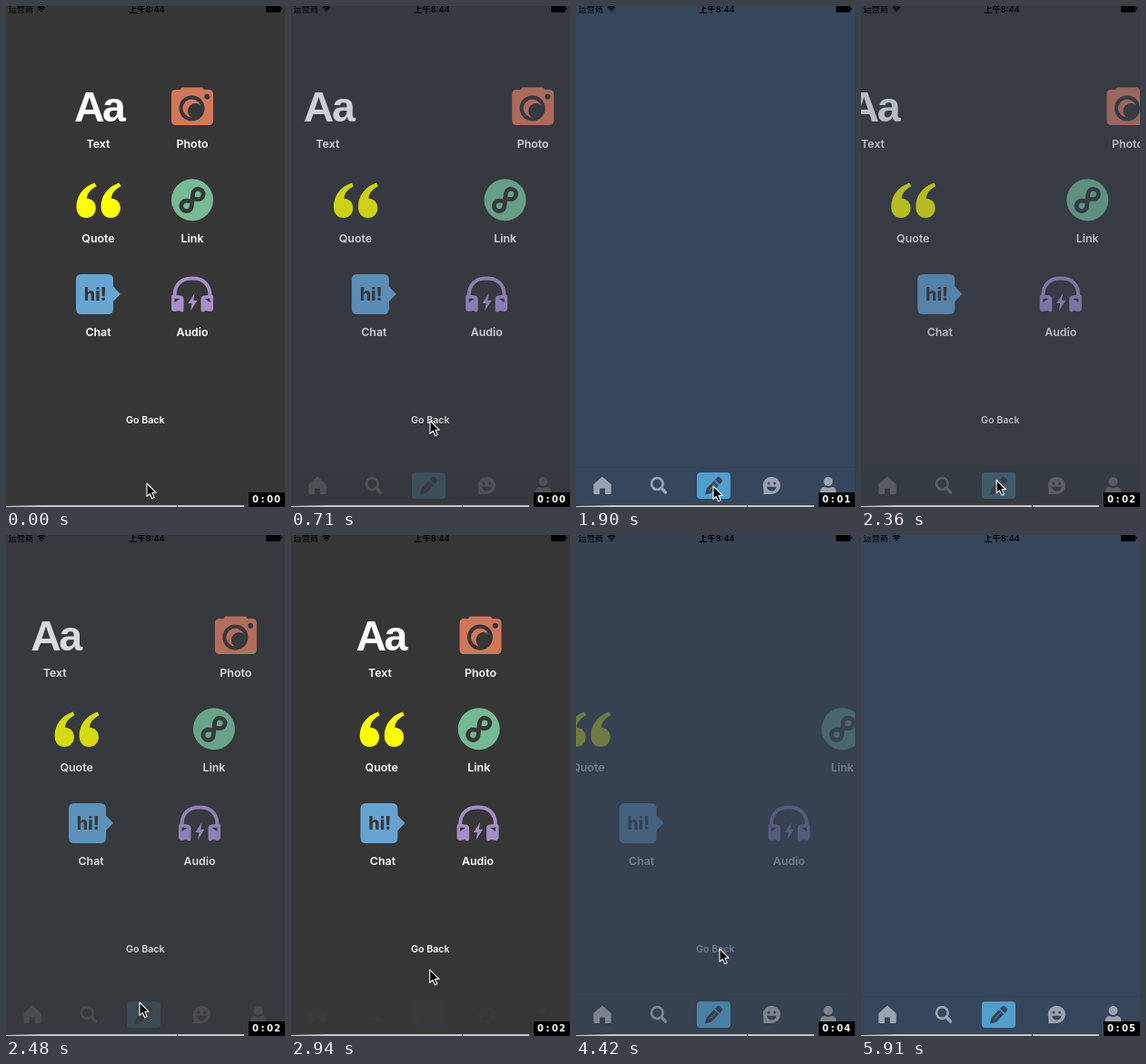
An HTML page that plays this animation: 307 px wide and 551 px high, repeating every 6010 ms.

```html
<!DOCTYPE html>
<html lang="zh">
<head>
<meta charset="utf-8">
<title>Post menu transition</title>
<style>
  html, body { margin: 0; width: 100%; height: 100%; overflow: hidden; background: #36465d; }
  svg { display: block; width: 100vw; height: 100vh; }
  text { font-family: Inter, "Noto Sans CJK SC", "Noto Sans CJK", sans-serif; }
  .label text { font-size: 12.4px; font-weight: 600; fill: #fff; text-anchor: middle; }
  .status { font-size: 9.2px; }
  .dark { fill: #363636; }
  #count { font: bold 10px "DejaVu Sans", sans-serif; fill: #fff; }
</style>
</head>
<body>
<svg viewBox="0 0 307 551" preserveAspectRatio="none">
  <defs>
    <path id="mark" d="M97.500 194.500C84.500 199 77.500 209 77.500 221C77.500 228.500 82 233 88.300 233C94.500 233 98.800 228.500 98.800 222.300C98.800 216 94.800 212 89 211.700C89.300 206 93 201.500 99.500 198.300Z"/>
    <g id="cup">
      <path d="M182 320Q182 317.500 184.500 317.500L192 318.500Q195.500 319.300 195.500 322V334Q195.500 336.500 193 336.500L190.500 335L185 336Q182 335.500 182 332.500Z" fill="#a78fcb"/>
      <path class="dark" d="M185.500 321.500L191.500 322L185.500 326Z"/>
    </g>
  </defs>

  <rect width="307" height="551" fill="#36465d"/>
  <rect y="507" width="307" height="1" fill="#000" opacity=".06"/>
  <g fill="#9ba2ae">
    <path d="M29 517.500L38.700 526V535.500Q38.700 537 37.200 537H32V530.500H26V537H20.800Q19.300 537 19.300 535.500V526Z"/>
    <g fill="none" stroke="#9ba2ae">
      <circle cx="89.300" cy="525.500" r="6.300" stroke-width="2.700"/>
      <path d="M94 530.300L98.500 535" stroke-width="3.400" stroke-linecap="round"/>
    </g>
    <rect x="133" y="513" width="37" height="29" rx="4" fill="#529ecc"/>
    <g fill="#36465d" transform="translate(142 537.500) rotate(-46)">
      <path d="M0 0L6 -3.600H18V3.600H6Z"/>
      <path d="M19.500 -3.600H22.500Q25 -3.600 25 -1.500V1.500Q25 3.600 22.500 3.600H19.500Z"/>
      <path d="M7 0H17" stroke="#529ecc" stroke-width=".8"/>
    </g>
    <circle cx="215.300" cy="527.300" r="9.600"/>
    <path d="M206.500 530L206.300 537.200L215 536.800Z"/>
    <g fill="#36465d">
      <circle cx="212" cy="525" r="1.500"/>
      <circle cx="218.700" cy="525" r="1.500"/>
      <path d="M210 528.800H220.600Q219.500 533.600 215.300 533.600Q211 533.600 210 528.800Z"/>
    </g>
    <circle cx="277.500" cy="523" r="5"/>
    <path d="M268.800 537V534Q268.800 529 274 529Q277.500 531 281 529Q286.200 529 286.200 534V537Z"/>
  </g>

  <g id="menu">
    <rect width="307" height="551" class="dark"/>
    <g class="label">
      <g data-shift="-246">
        <text x="101.500" y="156">Text</text>
        <text x="75" y="127" style="font:bold 46.500px 'Liberation Sans',sans-serif;letter-spacing:-2.500px;text-anchor:start">Aa</text>
      </g>
      <g data-shift="246">
        <text x="205" y="156">Photo</text>
        <path d="M187 92H191.500L193.500 89.500H216L218 92H223Q228 92 228 97V126Q228 131 223 131H187Q182 131 182 126V97Q182 92 187 92Z" fill="#d2775c"/>
        <circle class="dark" cx="204.500" cy="112.500" r="14"/>
        <circle cx="204.500" cy="112.500" r="10" fill="#d2775c"/>
        <circle class="dark" cx="208.500" cy="115.500" r="8.500"/>
        <circle class="dark" cx="221.300" cy="99.800" r="3"/>
      </g>
      <g data-shift="-123">
        <text x="101.500" y="259.500">Quote</text>
        <g fill="#ff0"><use href="#mark"/><use href="#mark" x="27"/></g>
      </g>
      <g data-shift="123">
        <text x="205" y="259.500">Link</text>
        <circle cx="205" cy="213.300" r="23" fill="#76bb94"/>
        <path d="M201.500 214.800H199.300a5.700 5.700 0 1 0 5.700 5.700V206.300a5.700 5.700 0 1 1 5.700 5.700H208.500" transform="rotate(6 205 213.400)" fill="none" stroke="#363636" stroke-width="4.800" stroke-linecap="round"/>
      </g>
      <g data-shift="-41">
        <text x="101.500" y="363">Chat</text>
        <path d="M83 295H112Q118 295 118 301V308.500L126 316.800L118 325V333Q118 339 112 339H83Q77 339 77 333V301Q77 295 83 295Z" fill="#68a5d3"/>
        <text x="98.300" y="323.500" style="font-size:19.500px;font-weight:800;fill:#363636">hi!</text>
      </g>
      <g data-shift="41">
        <text x="205" y="363">Audio</text>
        <path d="M185.500 319C185.500 306 193 299.500 205 299.500S224.500 306 224.500 319" fill="none" stroke="#a78fcb" stroke-width="4"/>
        <use href="#cup"/>
        <use href="#cup" transform="matrix(-1 0 0 1 410 0)"/>
        <path d="M207.500 316L200.300 327H204.500L203 335.500L210.500 323.800H206.300Z" fill="#a78fcb"/>
      </g>
      <text x="153.300" y="458.500" style="font-size:10.700px">Go Back</text>
    </g>
  </g>

  <g class="status">
    <text x="2.500" y="7">运营商</text>
    <text x="155" y="7" text-anchor="middle" font-weight="600">上午8:44</text>
    <g fill="none" stroke="#000" stroke-width="1.400">
      <path d="M34.800 2.300Q39 -1.500 43.200 2.300M36.500 4.200Q39 2 41.500 4.200"/>
    </g>
    <path d="M37.500 5.300Q39 4.300 40.500 5.300L39 7Z"/>
    <rect x="286" y="-1" width="16" height="8" rx="1.500"/>
    <rect x="302.500" y="1.500" width="1.300" height="3" rx=".6"/>
  </g>

  <rect y="548" width="307" height="3" fill="#3a3a3c"/>
  <path d="M0 550L40 549H267V551H0Z" fill="#c9c5c4"/>
  <path d="M188 548h1v3h-1zM262 548h5v3h-5z" fill="#444"/>
  <path id="cursor" d="M0 0V14.300L3.300 11.300L5.700 16.700L8.200 15.600L5.900 10.300H10.300Z" stroke="#fff" stroke-width="1.100" stroke-linejoin="round"/>
  <rect x="267" y="535" width="40" height="16"/>
  <text id="count" x="271 280.500 287 295" y="546">0:00</text>
</svg>
<script>
  const LOOP = 6010;
  const $ = id => document.getElementById(id);
  const menu = $('menu'), cursor = $('cursor'), count = $('count');
  const items = [...document.querySelectorAll('[data-shift]')];

  // The screen refreshes only at these moments.
  const ticks = [0, 120, 360, 710, 820, 940, 1060, 1180, 1900, 2020, 2130, 2250, 2360, 2480,
    2590, 2700, 2820, 2930, 3040, 3150, 3270, 3390, 3860, 3980, 4190, 4310, 4420, 4540,
    4660, 4780, 4900, 5010, 5230, 5910];
  const secondMarks = [1060, 2130, 3150, 4190, 5230];

  // time, x, y of the pointer tip
  const pointer = [[0, 155, 525], [120, 155, 460], [360, 153, 456], [820, 153, 456],
    [1180, 151, 522], [1900, 151, 528], [2250, 151, 528], [2480, 147, 514],
    [3270, 157, 451], [3390, 157, 451], [3860, 158, 455], [4420, 158, 455],
    [4780, 229, 539], [4900, 241, 543], [5010, 241, 543]];

  const clamp = v => Math.max(0, Math.min(1, v));

  function easeInOut(v) {
    v = clamp(v);
    return v < .5 ? 2 * v * v : 1 - 2 * (1 - v) * (1 - v);
  }

  function spring(ms) {
    const k = Math.max(0, ms) * .0071;
    return 1 - (1 + k) * Math.exp(-k);
  }

  // 1 when the menu is open, 0 when it is gone
  function openness(t) {
    if (t < 2050) return 1 - easeInOut((t - 576) / 380);
    if (t < 3390) return spring(t - 2053);
    return 1 - easeInOut((t - 4183) / 380);
  }

  function pointerAt(t) {
    const i = Math.max(1, pointer.findIndex(k => k[0] >= t));
    const [a, ax, ay] = pointer[i - 1], [b, bx, by] = pointer[i];
    const f = clamp((t - a) / (b - a));
    return [ax + (bx - ax) * f, ay + (by - ay) * f];
  }

  function draw(time) {
    const t = ticks.findLast(v => v <= time);
    const p = openness(t);
    menu.setAttribute('opacity', p);
    for (const el of items)
      el.setAttribute('transform', `translate(${el.dataset.shift * (1 - p)} 0)`);
    cursor.setAttribute('transform', `translate(${pointerAt(t).join(' ')})`);
    cursor.style.display = t < 5010 ? '' : 'none';
    count.textContent = '0:0' + secondMarks.filter(v => v <= t).length;
  }

  const start = performance.now();
  function loop(now) {
    draw(Math.max(0, now - start) % LOOP);
    requestAnimationFrame(loop);
  }
  draw(0);
  requestAnimationFrame(loop);
</script>
</body>
</html>
```
